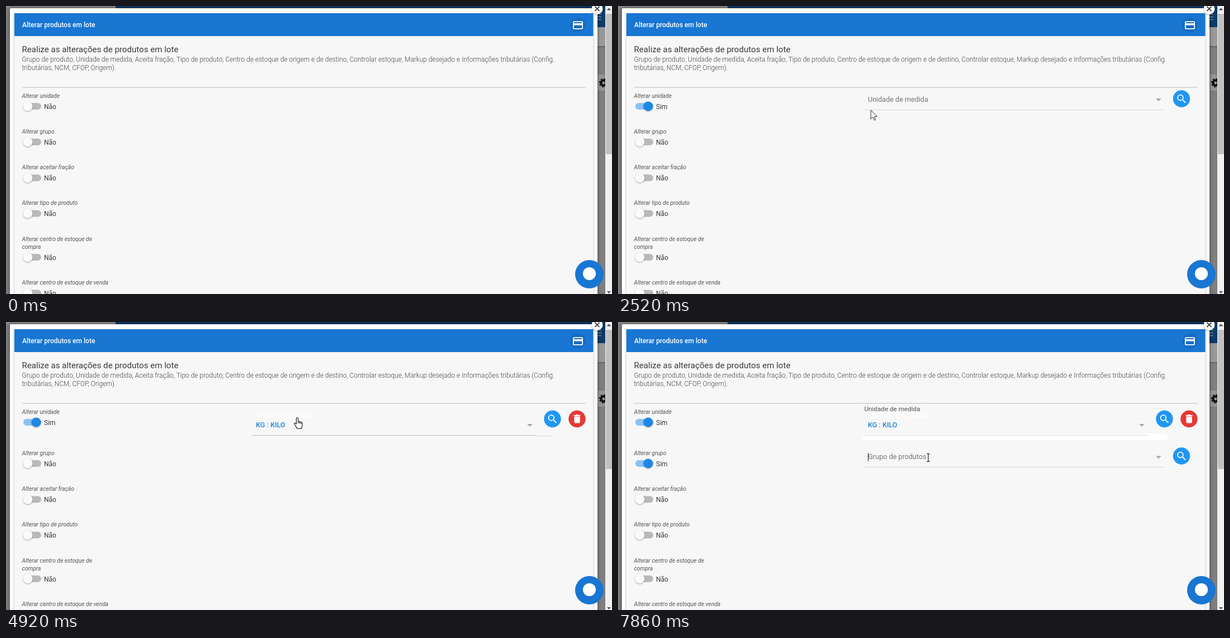
An HTML page for the animation above (8000 ms loop, 1084 by 517 pixels).

```html
<!DOCTYPE html>
<html lang="pt-BR">
<head>
<meta charset="utf-8">
<title>Alterar produtos em lote</title>
<style>
  html, body { margin: 0; width: 100%; height: 100%; overflow: hidden; background: #757575; }
  body { position: relative; font: 12px Roboto, sans-serif; }
  svg { position: absolute; left: 0; top: 0; display: block; }
  text { fill: #3a3a3a; white-space: pre; }
  .title { font-weight: 500; fill: #fff; }
  .head { font-size: 15.1px; }
  .intro { font-size: 11.93px; font-weight: 300; fill: #444; }
  .name { font-size: 10.3px; font-style: italic; fill: #555; }
  .hint { font-size: 12.6px; fill: #757575; }
  .typed { font-size: 12.9px; fill: #222; }
  .value { font-size: 12.6px; font-weight: 500; fill: #1e88e5; }
  .caret { stroke: #222; }
  .knob { filter: drop-shadow(0 1px 1px rgba(0, 0, 0, .35)); }
  .dialog { filter: drop-shadow(0 0 3px rgba(0, 0, 0, .45)); }
  .card { filter: drop-shadow(0 1px 2px rgba(0, 0, 0, .3)); }

  /* Hard switches: 1% = 80 ms */
  .no1, .yes1, .old, .new, .k, .kg, .c1, .no2, .yes2, .group, .c2, .bar,
  .rest, .thumb, .ghost, .arrow, .hand, .beam { animation: 8s step-end infinite; }
  .yes1, .old, .new, .k, .kg, .c1, .yes2, .group, .c2, .bar,
  .arrow, .hand, .beam { opacity: 0; }
  .no1 { animation-name: no1; }
  .yes1 { animation-name: yes1; }
  .old { animation-name: old; }
  .new { animation-name: new; }
  .k { animation-name: k; }
  .kg { animation-name: kg; }
  .c1 { animation-name: c1; }
  .no2 { animation-name: no2; }
  .yes2, .group { animation-name: yes2; }
  .c2 { animation-name: c2; }
  .bar { animation-name: bar; }
  .rest { animation-name: rest; }
  .thumb { animation-name: thumb; }
  .ghost { animation-name: ghost; }
  .arrow { animation-name: arrow; }
  .hand { animation-name: hand; }
  .beam { animation-name: beam; }
  @keyframes no1 { 0% { opacity: 1 } 23.25% { opacity: 0 } }
  @keyframes yes1 { 0% { opacity: 0 } 23.25% { opacity: 1 } }
  @keyframes old { 0% { opacity: 0 } 23.25% { opacity: 1 } 60.75% { opacity: 0 } }
  @keyframes new { 0% { opacity: 0 } 61.5% { opacity: 1 } }
  @keyframes k { 0% { opacity: 0 } 46.5% { opacity: 1 } 51% { opacity: 0 } }
  @keyframes kg { 0% { opacity: 0 } 51% { opacity: 1 } 59.25% { opacity: 0 } }
  @keyframes c1 { 0% { opacity: 0 } 36% { opacity: 1 } 42.75% { opacity: 0 } }
  @keyframes no2 { 0% { opacity: 1 } 89.25% { opacity: 0 } }
  @keyframes yes2 { 0% { opacity: 0 } 89.25% { opacity: 1 } }
  @keyframes c2 { 0% { opacity: 0 } 98.25% { opacity: 1 } }
  @keyframes bar { 0% { opacity: 0 } 65.25% { opacity: 1 } }
  @keyframes rest { 0% { transform: none } 61.5% { transform: translateY(10px) } }
  @keyframes thumb { 0% { height: 252px } 61.5% { height: 250px } }
  @keyframes ghost { 0% { opacity: 0 } 23.25% { opacity: 1; fill: #757575 } 46.5% { opacity: 1; fill: #fff } }
  @keyframes arrow {
    0% { opacity: 0 } 3% { opacity: 1 } 18.75% { opacity: 0 } 27% { opacity: 1 } 33.75% { opacity: 0 }
    76.5% { opacity: 1 } 82.5% { opacity: 0 } 91.5% { opacity: 1 } 97.5% { opacity: 0 }
  }
  @keyframes hand {
    0% { opacity: 0 } 18.75% { opacity: 1 } 27% { opacity: 0 }
    61.5% { opacity: 1 } 76.5% { opacity: 0 } 82.5% { opacity: 1 } 91.5% { opacity: 0 }
  }
  @keyframes beam { 0% { opacity: 0 } 33.75% { opacity: 1 } 61.5% { opacity: 0 } 97.5% { opacity: 1 } }

  /* Smooth motion */
  .t1 .track { animation: track1 8s linear infinite; }
  .t1 .knob { animation: knob1 8s ease-in-out infinite; }
  .t2 .track { animation: track2 8s linear infinite; }
  .t2 .knob { animation: knob2 8s ease-in-out infinite; }
  @keyframes track1 { 0%, 24.5% { fill: #b9b9b9 } 27.5%, 100% { fill: #8ac2f4 } }
  @keyframes knob1 {
    0%, 24.5% { transform: none; fill: #fafafa } 27.5%, 100% { transform: translateX(15px); fill: #1e88e5 }
  }
  @keyframes track2 { 0%, 90% { fill: #b9b9b9 } 93%, 100% { fill: #8ac2f4 } }
  @keyframes knob2 {
    0%, 90% { transform: none; fill: #fafafa } 93%, 100% { transform: translateX(15px); fill: #1e88e5 }
  }
  .value { animation: value 8s linear infinite; }
  @keyframes value { 0%, 62% { fill: #1e88e5 } 65.25%, 76% { fill: #0d3f94 } 79%, 100% { fill: #1e88e5 } }
  .label { font-size: 11.7px; fill: #555; animation: label 8s ease-out infinite; }
  @keyframes label {
    0%, 62% { opacity: 0; transform: translateY(8px) } 65.25%, 100% { opacity: 1; transform: none }
  }
  .shade { animation: shade 8s linear infinite; }
  @keyframes shade { 0%, 61.9% { opacity: 1 } 65.25%, 100% { opacity: 0 } }
  .menu {
    position: absolute; left: 441px; top: 187px; width: 504px; overflow: hidden;
    background: #e6e6e6; box-shadow: 0 1px 3px rgba(0, 0, 0, .55);
    animation: menu 8s linear infinite;
  }
  .menu span {
    position: absolute; left: 7px; top: 9px; font-size: 12.6px; line-height: 14px;
    white-space: pre; color: #111;
  }
  .menu b { font-weight: 500; color: #2b3e55; }
  @keyframes menu {
    0%, 52.5% { height: 0; opacity: 0 } 52.6% { height: 1px; opacity: 1 } 54% { height: 22px }
    56.25%, 58.5% { height: 36px; opacity: 1 } 59.25%, 100% { height: 36px; opacity: 0 }
  }
  .cursor { animation: move 8s linear infinite; }
  @keyframes move {
    0%, 3% { transform: translate(1064px, 150px) }
    7.5% { transform: translate(705px, 82px) }
    12.75% { transform: translate(314px, 143px) }
    16% { transform: translate(140px, 168px) }
    19.5%, 25.5% { transform: translate(49px, 178px) }
    29% { transform: translate(300px, 186px) }
    32.25% { transform: translate(497px, 187px) }
    36%, 75.74% { transform: translate(521px, 172px) }
    75.75% { transform: translate(377px, 187px) }
    78.5% { transform: translate(178px, 200px) }
    81% { transform: translate(105px, 219px) }
    84%, 90.75% { transform: translate(49px, 252px) }
    94% { transform: translate(330px, 252px) }
    97% { transform: translate(548px, 247px) }
    98.25%, 100% { transform: translate(555px, 243px) }
  }
</style>
</head>
<body>
<svg width="1084" height="517" viewBox="0 0 1084 517">
  <defs>
    <g id="search">
      <circle r="15.2" fill="#2196f3"/>
      <path transform="translate(-10.4 -10.4) scale(.88)" fill="#fff" d="M15.5 14h-.79l-.28-.27A6.47 6.47 0 0 0 16 9.5 6.5 6.5 0 1 0 9.5 16c1.61 0 3.09-.59 4.23-1.57l.27.28v.79l5 4.99L20.49 19zM9.5 14a4.5 4.5 0 1 1 0-9 4.5 4.5 0 0 1 0 9z"/>
    </g>
    <g id="switch">
      <rect class="track" x="31" y="-6" width="32" height="12" rx="6" fill="#b9b9b9"/>
      <circle class="knob" cx="39" r="8.5" fill="#fafafa"/>
    </g>
    <path id="drop" d="M-5-2.5H5L0 2.5z" fill="#aaa"/>
  </defs>

  <!-- Page behind the dialog -->
  <rect width="1084" height="517" fill="#7f7f7f"/>
  <rect width="196" height="4" fill="#8a8a8a"/>
  <rect x="196" width="876" height="38" fill="#0c3a68"/>
  <path d="M1056 14.5h9M1056 19.5h9M1056 24.5h9" stroke="#6f8ba8" stroke-width="1.5"/>
  <rect x="1058" y="38" width="14" height="34" fill="#999"/>
  <rect x="1058" y="72" width="14" height="2" fill="#666"/>
  <rect x="1058" y="122" width="14" height="31" fill="#959595" stroke="#707070"/>
  <circle cx="1069" cy="138" r="4.5" fill="none" stroke="#111" stroke-width="4"/>
  <circle cx="1069" cy="138" r="7" fill="none" stroke="#111" stroke-width="2.5" stroke-dasharray="3 2.5"/>

  <!-- Dialog -->
  <path class="dialog" d="M7 530V6q0-2 2-2h1047q2 0 2 2v524z" fill="#fff"/>
  <rect x="1072" width="12" height="517" fill="#f1f1f1"/>
  <rect class="thumb" x="1073" y="14" width="11" height="252" fill="#c1c1c1"/>
  <path d="M1074.5 7.5l4-4 4 4zM1075 512h7l-3.500 4z" fill="#505050"/>
  <rect class="card" x="15" y="13" width="1035.5" height="520" fill="#f7f7f7"/>
  <rect x="15" y="13" width="1035.5" height="41" fill="#1976d2"/>
  <text class="title" x="29" y="38">Alterar produtos em lote</text>
  <circle cx="1023" cy="34.5" r="13.5" fill="#176bc0"/>
  <path transform="translate(1012.2 23.7) scale(.9)" fill="#fff" d="M20 4H4a2 2 0 0 0-2 2v12c0 1.1.9 2 2 2h16a2 2 0 0 0 2-2V6a2 2 0 0 0-2-2zm0 14H4v-6h16zm0-10H4V6h16z"/>
  <circle class="knob" cx="1057.5" cy="5" r="10" fill="#fff"/>
  <path d="M1053.5 1l8 8m0-8l-8 8" stroke="#444" stroke-width="1.8"/>
  <text class="head" x="28.5" y="82.5">Realize as alterações de produtos em lote</text>
  <text class="intro" x="28.5" y="100">Grupo de produto, Unidade de medida, Aceita fração, Tipo de produto, Centro de estoque de origem e de destino, Controlar estoque, Markup desejado e Informações tributárias (Config.</text>
  <text class="intro" x="28.5" y="115">tributárias, NCM, CFOP, Origem).</text>
  <path d="M29 146h1008" stroke="#d9d9d9" stroke-width="2"/>

  <!-- Unit row -->
  <g transform="translate(0 180)">
    <text class="name" x="28.5" y="-15.5">Alterar unidade</text>
    <g class="t1">
      <rect class="track" x="31" y="-6" width="32" height="12" rx="6" fill="#b9b9b9"/>
      <circle class="knob" cx="39" r="8.5" fill="#fafafa"/>
    </g>
    <text class="no1" x="68" y="4.5">Não</text>
    <text class="yes1" x="68" y="4.5">Sim</text>
  </g>
  <g class="old">
    <path d="M440 186.5h539" stroke="#dcdcdc"/>
    <use href="#drop" x="967" y="168.5"/>
    <use href="#search" x="1008" y="166.5"/>
  </g>
  <rect class="bar" x="437" y="201" width="546" height="11" rx="4" fill="#fff"/>
  <text class="hint ghost" x="447" y="171.5" opacity="0">Unidade de medida</text>
  <path class="caret c1" d="M447.5 160v16"/>
  <g class="k">
    <text class="typed" x="447" y="171.5">k</text>
    <path class="caret" d="M455.5 160v16"/>
  </g>
  <g class="kg">
    <text class="typed" x="447" y="171.5">kg</text>
    <path class="caret" d="M461.5 160v16"/>
  </g>
  <g class="new">
    <path d="M441 203.5h508" stroke="#dcdcdc"/>
    <g class="shade">
      <path d="M441 203.5h508" stroke="#bbb"/>
      <path d="M949 204.5h30" stroke="#dcdcdc"/>
    </g>
    <text class="label" x="440.5" y="159.5">Unidade de medida</text>
    <text class="value" x="447" y="188.5">KG : KILO</text>
    <use href="#drop" x="937" y="185.5"/>
    <use href="#search" x="977.5" y="174"/>
    <circle cx="1021.5" cy="174" r="15.2" fill="#e53935"/>
    <path transform="translate(1011.3 163.5) scale(.86)" fill="#fff" d="M6 19c0 1.1.9 2 2 2h8a2 2 0 0 0 2-2V7H6zM19 4h-3.5l-1-1h-5l-1 1H5v2h14z"/>
  </g>

  <!-- Remaining rows -->
  <g class="rest">
    <g transform="translate(0 244)">
      <text class="name" x="28.5" y="-15.5">Alterar grupo</text>
      <g class="t2">
        <rect class="track" x="31" y="-6" width="32" height="12" rx="6" fill="#b9b9b9"/>
        <circle class="knob" cx="39" r="8.5" fill="#fafafa"/>
      </g>
      <text class="no2" x="68" y="4.5">Não</text>
      <text class="yes2" x="68" y="4.5">Sim</text>
    </g>
    <g transform="translate(0 308.5)">
      <text class="name" x="28.5" y="-15.5">Alterar aceitar fração</text>
      <use href="#switch"/>
      <text x="68" y="4.5">Não</text>
    </g>
    <g transform="translate(0 372.5)">
      <text class="name" x="28.5" y="-15.5">Alterar tipo de produto</text>
      <use href="#switch"/>
      <text x="68" y="4.5">Não</text>
    </g>
    <g transform="translate(0 451)">
      <text class="name" x="28.5" y="-29.5">Alterar centro de estoque de</text>
      <text class="name" x="28.5" y="-15">compra</text>
      <use href="#switch"/>
      <text x="68" y="4.5">Não</text>
    </g>
    <g transform="translate(0 515.5)">
      <text class="name" x="28.5" y="-15.5">Alterar centro de estoque de venda</text>
      <use href="#switch"/>
      <text x="68" y="4.5">Não</text>
    </g>
  </g>
  <g class="group">
    <path d="M440 260.5h539" stroke="#dcdcdc"/>
    <text class="hint" x="447.5" y="246">Grupo de produtos</text>
    <use href="#drop" x="967" y="243"/>
    <use href="#search" x="1008" y="240.5"/>
  </g>
  <path class="caret c2" d="M447.5 235v15"/>

  <!-- Chat button -->
  <circle cx="1043.5" cy="481.5" r="25.5" fill="#1976d2"/>
  <circle cx="1043.5" cy="480.5" r="11.5" fill="#fff"/>
</svg>

<div class="menu"><span><b>KG</b> : KILO</span></div>

<svg width="1084" height="517" viewBox="0 0 1084 517">
  <g class="cursor" stroke="#222" stroke-linejoin="round">
    <path class="arrow" fill="#fff" d="M0 0V16L3.7 12.5 6.2 18.3 8.6 17.3 6.1 11.6H11.3z"/>
    <path class="hand" fill="#fff" stroke-width="1.2" d="M-1.6 11V1.5a1.6 1.6 0 0 1 3.2 0V7.5a1.5 1.5 0 0 1 2.8.4 1.4 1.4 0 0 1 2.5.6 1.2 1.2 0 0 1 2 .8V13.5c0 2-1.4 3-1.4 5.7H-.5C-1 17-3 14.5-5 11.5c-1-1.8 1-2.8 2-1.5zM1.6 7.5V10M4.4 8V10.5M6.9 8.5V11"/>
    <path class="beam" fill="none" stroke-width="1.2" d="M-3-6.5h2.2l.8.8.8-.8H3M0-5.7V6.7M-3 7.5h2.2l.8-.8.8.8H3"/>
  </g>
</svg>
</body>
</html>
```
